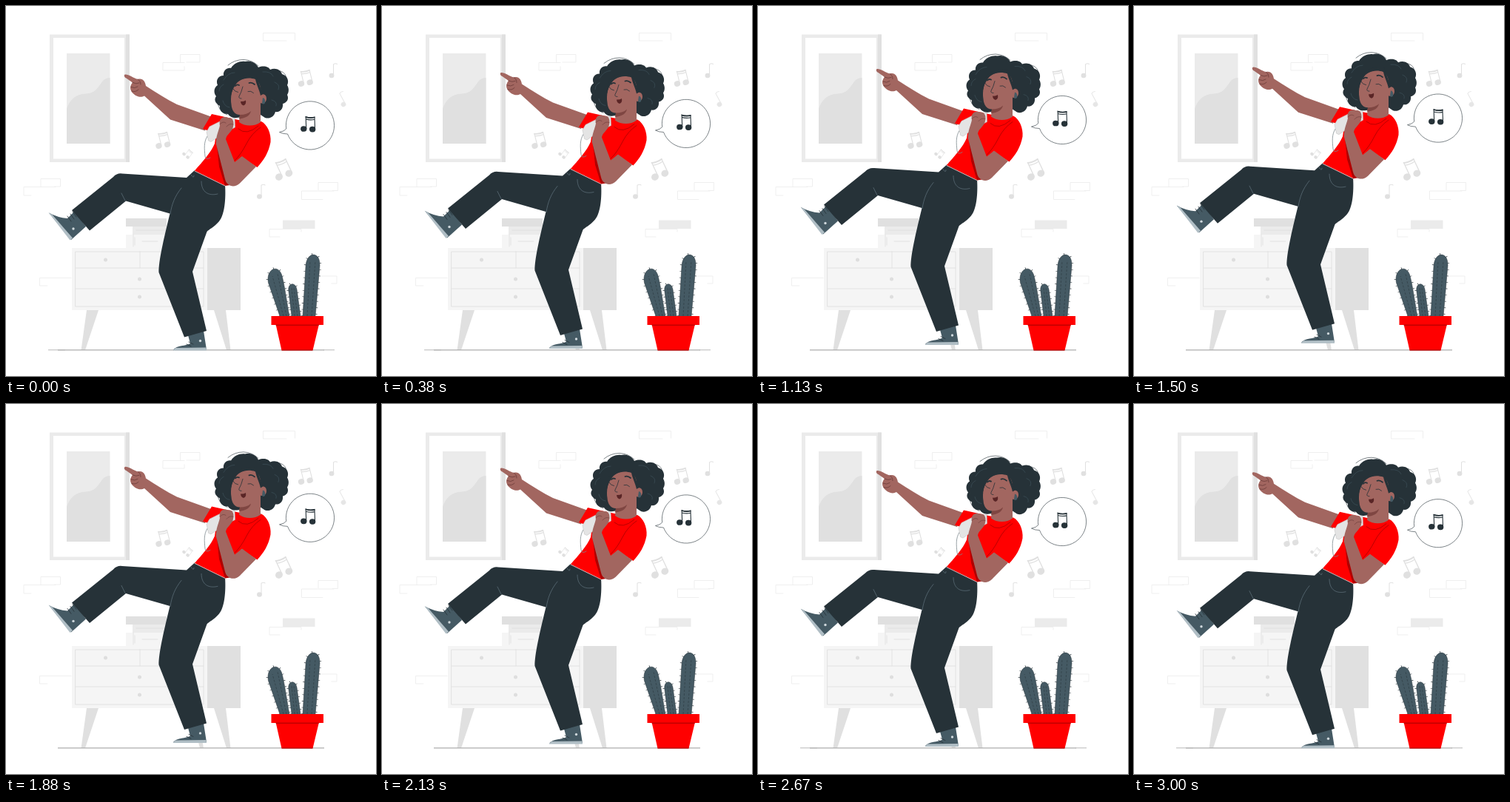
An HTML page for the animation above (3.04 s loop, 500 by 500 pixels).

```html
<!DOCTYPE html>
<html lang="en">
<head>
<meta charset="utf-8">
<title>Singing and dancing</title>
<style>
html, body { margin: 0; width: 100%; height: 100%; overflow: hidden; background: #fff; }
svg { display: block; width: 100%; height: 100%; }
.line { fill: none; stroke-width: .8; stroke-linecap: round; stroke-linejoin: round; }
.skin { fill: #a26660; }
.dark { fill: #263238; }
.slate { fill: #455a64; }
.red { fill: #f00; }
</style>
</head>
<body>
<svg viewBox="0 0 500 500">
  <defs>
    <g id="pair">
      <ellipse rx="4.2" ry="3.8"/>
      <ellipse cx="11.8" cy="1" rx="4.2" ry="3.8"/>
      <path d="M3.4 0V-16Q9 -14 15.2 -15.2V1M3.4 -13Q9 -11 15.2 -12.2" fill="none" stroke="currentColor" stroke-width="1.1"/>
      <path d="M2.9 -17Q9 -14.6 15.7 -16V-14.2Q9 -12.8 2.9 -15.2Z"/>
    </g>
    <g id="single">
      <ellipse rx="3.4" ry="3.2"/>
      <path d="M2.5 0V-15.5Q5 -17 8 -15.5" fill="none" stroke="currentColor"/>
    </g>
  </defs>

  <!-- Wall -->
  <path class="line" stroke="#ebebeb" d="M379 47H347.5V36.5H390.5V46
    M235.5 76V65.5H262V76H244M241 76.5H212V87H241V82
    M47 244V233.5H73.5V244H66M67 244.5H24V256H34
    M422 249V238.5H448.5V249.5H441M443 250H399.5V261.5H428
    M399 305V301.5H356V312H370M88 367.5H45.5V378H56M424 365H447V375H440"/>
  <path fill="#ebebeb" d="M374 289.500H417.500V301H374ZM59 38.500H167V211H59Z"/>
  <path fill="#e0e0e0" d="M162 38.500H167V211H162Z"/>
  <path fill="#fff" d="M64 43H160V206.500H64Z"/>
  <path fill="#ebebeb" d="M82 64H140.500V186H82Z"/>
  <path fill="#e0e0e0" d="M82 139C88 122 99 119 108 118.500C122 118 125 108 131 101C134 98 137 97 140.500 97V186H82Z"/>

  <g fill="#e0e0e0" color="#e0e0e0">
    <use href="#pair" transform="translate(206.500 189)rotate(-14)"/>
    <use href="#pair" transform="translate(240.500 200)rotate(36)scale(.56)"/>
    <use href="#pair" transform="translate(399 105)rotate(-14)"/>
    <use href="#pair" transform="translate(369 231)rotate(-25)scale(1.2)"/>
    <use href="#single" transform="translate(440 94)"/>
    <use href="#single" transform="translate(342.500 257.500)"/>
    <use href="#single" transform="translate(456 133)rotate(-28)" opacity=".8"/>
  </g>

  <!-- Cabinet and books -->
  <path fill="#e0e0e0" d="M109 411H125L107 465H101.500ZM281 411H297L303.500 465H298ZM248 411H258L267 465H262ZM162 287H217V298H162Z"/>
  <path fill="#ebebeb" d="M171 298H217V309H171Z"/>
  <path fill="#f5f5f5" d="M162 309H217V327H162ZM89 327H272V411H89Z"/>
  <path fill="#e0e0e0" d="M272 327H317V411H272Z"/>
  <path class="line" stroke="#dedede" d="M94 332H267V406H94ZM94 354H267M94 382H267M181 332V354M176 303H215M172 309V325M174 313V323M184 318H205"/>
  <g fill="#dedede">
    <circle cx="134.500" cy="343" r="2.500"/>
    <circle cx="180.500" cy="369" r="2.500"/>
    <circle cx="180.500" cy="393" r="2.500"/>
  </g>

  <!-- Floor -->
  <path stroke="#adadad" stroke-width="1.3" d="M70 464.800H430"/>
  <path id="ends" stroke="#b8b8b8" stroke-width="1" d="M57 464.800H80M429 464.800H444"/>

  <!-- Plant -->
  <g id="cactus" fill="none" stroke="#263238" stroke-width=".5"></g>
  <path class="red" d="M364.500 430H423L414.500 465.500H372.500ZM358.500 419H429V431H358.500Z"/>
  <path class="line" stroke="#8a0000" d="M365 431.200H422.500M373 465H414"/>

  <g id="dancer">
    <!-- Speech bubble -->
    <path fill="#fff" stroke="#263238" stroke-width=".6" d="M378.700 166A32.600 32.600 0 1 1 380.500 173Q374 173 369.500 170.500Q376 169.500 378.700 166Z"/>
    <use href="#pair" class="dark" color="#263238" transform="translate(402.300 166)rotate(-2)"/>

    <!-- Shoes -->
    <path class="slate" d="M58 279.500Q70 286 83 287L93 277L108 298L88 316Z"/>
    <path fill="#b0bec5" d="M57.500 279L62.500 282L90 313.500L86.500 316.500Z"/>
    <path class="slate" d="M246 445L267 439L271 464.500H226C231 458 243 460 249 456Z"/>
    <path fill="#b0bec5" d="M229 462L270.500 461.500L271 465.500H225.500Z"/>
    <path class="line" stroke="#263238" d="M83 284L88 291M87 281L92 288M90 278L95 285M247 454L253 457M244 457L250 460"/>
    <g fill="#cfd8dc"><circle cx="91" cy="301" r="1.700"/><circle cx="262.500" cy="452.500" r="1.700"/></g>

    <!-- Pointing arm -->
    <path class="skin" d="M161 92.500C165 92 172 97 178 99C185 97 188 102 189 108C203 117 217 126 231 133L277 149.500L269 168.500L222 153.500L187 121.500C181 125 173 121 169.500 115.500C167 111 168 107 171 103.500L162.500 97.500C159.500 96 159 93 161 92.500Z"/>
    <path class="line" stroke="#6b3b39" d="M171 103.500Q176 106 180 104M169 109.500Q174 112 178 109M170 115Q175 117 179 113M178 99Q182 101 182 106"/>

    <!-- Trousers -->
    <path class="dark" d="M255 222L296 241.500C297.500 262 295 283 288 291C281 299 274 302 271.500 305L252 359L271 439L241 447.500L206.500 360C206 346 213 315 221.500 280.500L162 263.500L113 303.500L89 276L145 231Q150 225.500 157 226.500L244 232Z"/>
    <path class="line" stroke="#5b6d76" stroke-width=".6" d="M264 237C264 252 274 257 286 254M237 246C228 257 224 268 222 281M156 253L161 263M250 228Q254 234 254 229"/>

    <!-- Shirt -->
    <path class="red" d="M278 146L314 154L345 156C353 160 358.500 172 357.500 184C355 198 348 209 339.500 218L318 204L296.500 243L255 222.500C265 211 277 198 282 186L284 172L266 166Z"/>
    <path fill="#b00000" d="M284 180L289 198L297 234L303 242L296 243L288 217Z"/>
    <path class="line" stroke="#ffd5d5" d="M255 223L296 243"/>
    <path class="line" stroke="#8a0000" style="stroke-width:.6" d="M314 166Q325 176 341 162M344 164Q332 172 325 186T309 209"/>

    <!-- Microphone -->
    <path class="line" stroke="#7d888d" d="M272 176C267 184 268 193 269 203Q270 209 276 205"/>
    <path fill="#e4e4e4" stroke="#c5c5c5" stroke-width=".6" d="M275 163L291 155L309 151.500L309.500 164L294 172L277 183.500L273.500 182L271 170Z"/>

    <!-- Bent arm -->
    <path class="skin" d="M319 203L338 217L316 239.500C308 247 298 243 296 234L284 187C283 176 288 168 289 161C287 153 293 148 300 151C307 150 309 157 306.500 165C303 172 298 174 297 180L309 211Z"/>
    <path class="line" stroke="#6b3b39" style="stroke-width:.6" d="M289 160Q293 155 297 158M298 163Q302 158 307 160"/>

    <!-- Head -->
    <path class="dark" d="M312 151C306 152 302 149 300 146C292 146 288 141 289 135C282 131 281 126 284 122C280 117 281 110 286 107C283 100 287 94 294 94C293 87 299 83 304 84C308 77 317 74 323 75C331 73 338 77 341 83C348 80 355 82 357 86C364 83 371 86 373 92C380 94 383 101 380 107C383 112 382 117 380 120C383 126 379 131 374 132C375 140 369 144 364 143C362 150 356 153 350 151L344 147Z"/>
    <path class="skin" d="M310 105C317 98 328 94 337 98C343 103 345 111 344.500 120C348 118 352 120 352 125C352 130 348 133 344 131L344 157C336 163 323 163 315 157L316 147C309 147 305 141 304.500 133C303 124 305 111 310 105Z"/>
    <path fill="#7f4642" d="M316 147Q326 147 331 142Q329 151 315 152.500Z"/>
    <path class="dark" d="M304 121C302 103 315 90 338 93L347 119L344 121C342 112 339 108 337 99C326 95 314 99 310 107Q306 112 304 121Z"/>
    <path class="slate" d="M347 124Q351 125 350 131Q348 134 346 131Z"/>
    <path class="line" stroke="#263238" d="M320 109Q318 117 315 122Q314 125 318 125M307 112Q309 116 313.500 116.500M327 115.500Q331 114 334.500 117.500"/>
    <path class="line" stroke="#263238" style="stroke-width:1.8" d="M328.500 104Q332 102.500 336 106M310 108Q312 105.500 315 107"/>
    <path fill="#5a2526" d="M317 129Q321 129.500 324 127.500Q325 133 321 134.500Q317.500 133.500 317 129Z"/>
    <path class="line" stroke="#263238" style="stroke-width:.6" d="M300 80Q309 72.500 321 72.500Q333 73 341 81M365 87Q377 87 379 97M285 125Q286 143 299 147"/>
    <path class="line" stroke="#455a64" style="stroke-width:.5" d="M294 100Q300 90 309 90M288 115Q288 109 294 106M347 89Q358 88 361 95M363 103Q371 106 368 113M359 127Q367 129 365 135M293 128Q295 136 302 137"/>
  </g>
</svg>
<script>
const LOOP = 3040, LIFT = 10;
const dancer = document.getElementById("dancer");
const ends = document.getElementById("ends");

// Each stem: outline, then its ribs. Spines are a wide dashed stroke.
const stems = [
  ["M370 419L354.500 374C351 356 367 348 372.500 363C376 374 380 403 383 419", "M375 419L360 365M379 419L367 362"],
  ["M386 419L382 386C380 374 391 372 393 383L398 419", "M390 419L386 381M394 419L389 381"],
  ["M401 419L405 352C406 331 425 331 424 351L418 419", "M407 419L411 344M413 419L418 344"]
];
document.getElementById("cactus").innerHTML = stems.map(([edge, ribs]) =>
  `<path stroke-width="4.600" stroke-dasharray=".6 8" d="${edge}"/>
   <path class="slate" d="${edge}"/>
   <path stroke-dasharray="3 2" d="${ribs}"/>`).join("");

function draw(now) {
  const phase = now % LOOP / LOOP;
  const rise = LIFT * (1 - Math.abs(2 * phase - 1));
  dancer.setAttribute("transform", `translate(0 ${-rise})`);
  ends.setAttribute("opacity", rise < 3.3 ? 1 : 0);
  requestAnimationFrame(draw);
}
draw(performance.now());
</script>
</body>
</html>
```
